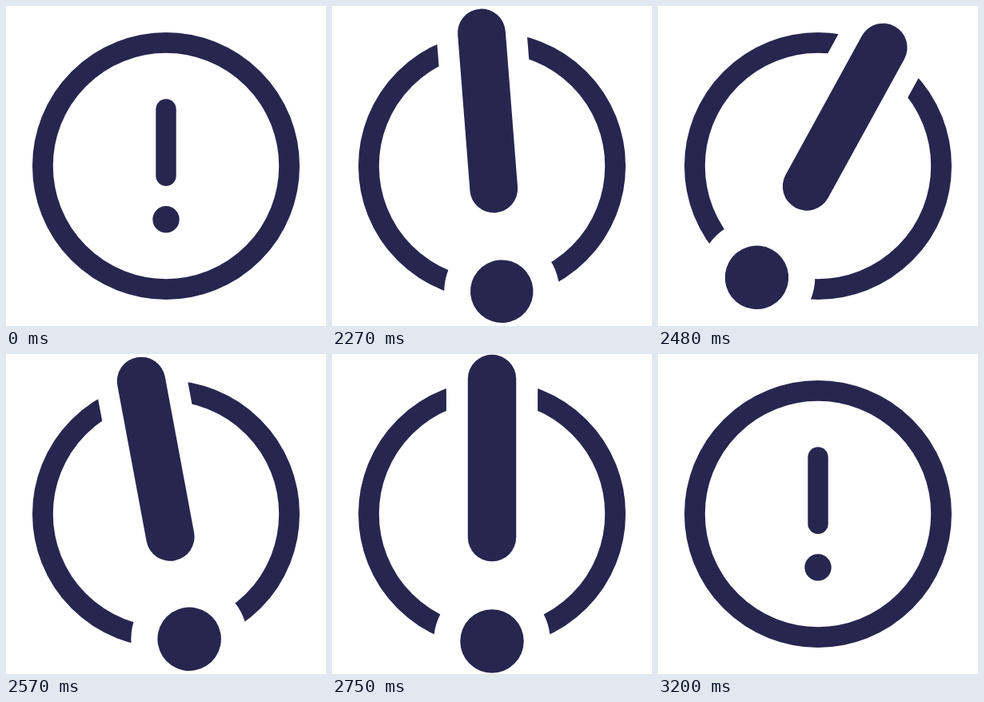
Recreate the animation shown at these times as an HTML page with a canvas. Size 400 px wide and 400 px high, loop 3260 ms.

```html
<!DOCTYPE html>
<html lang="en">
<head>
<meta charset="utf-8">
<title>Alert icon</title>
<style>
  html, body { margin: 0; width: 100%; height: 100%; overflow: hidden; background: #fff; }
  canvas { display: block; width: 100vmin; height: 100vmin; }
</style>
</head>
<body>
<canvas id="stage" width="400" height="400"></canvas>
<script>
const ctx = document.getElementById("stage").getContext("2d");
const INK = "#28264f";
const PAPER = "#fff";
const LOOP = 3260;
const STEP = 30;
const MOVE_START = 2030;
const MOVE_END = 3200;

const GROW = { start: 2015, length: 280 };
const SHRINK = { start: 2745, length: 450 };
const MAX_SCALE = 2.38;

const SWING = { start: 2238, length: 127, angle: 30.1 };
const POSES = [0, -1, 1, -1, 0];

const clamp = (x) => Math.min(1, Math.max(0, x));
const ease = (x) => (1 - Math.cos(Math.PI * clamp(x))) / 2;
const progress = (t, part) => ease((t - part.start) / part.length);

function scaleAt(t) {
  return 1 + (MAX_SCALE - 1) * (progress(t, GROW) - progress(t, SHRINK));
}

function angleAt(t) {
  const u = (t - SWING.start) / SWING.length;
  if (u <= 0 || u >= POSES.length - 1) return 0;
  const i = Math.floor(u);
  const pose = POSES[i] + (POSES[i + 1] - POSES[i]) * ease(u - i);
  return pose * SWING.angle * Math.PI / 180;
}

// The mark is drawn around the stage centre; a grown white copy cuts the ring.
function drawMark(color, barRadius, dotRadius) {
  ctx.strokeStyle = ctx.fillStyle = color;
  ctx.lineCap = "round";
  ctx.lineWidth = barRadius * 2;
  ctx.beginPath();
  ctx.moveTo(0, -71);
  ctx.lineTo(0, 12.2);
  ctx.stroke();
  ctx.beginPath();
  ctx.arc(0, 66.8, dotRadius, 0, Math.PI * 2);
  ctx.fill();
}

function draw(t) {
  ctx.setTransform(1, 0, 0, 1, 0, 0);
  ctx.fillStyle = PAPER;
  ctx.fillRect(0, 0, 400, 400);
  ctx.translate(200, 200);

  ctx.strokeStyle = INK;
  ctx.lineWidth = 25.8;
  ctx.beginPath();
  ctx.arc(0, 0, 154.1, 0, Math.PI * 2);
  ctx.stroke();

  ctx.rotate(angleAt(t));
  const s = scaleAt(t);
  ctx.scale(s, s);
  drawMark(PAPER, 24, 30.6);
  drawMark(INK, 12.7, 16.7);
}

function stepped(t) {
  if (t < MOVE_START || t >= MOVE_END) return 0;
  return MOVE_START + Math.floor((t - MOVE_START) / STEP) * STEP;
}

function tick() {
  draw(stepped(performance.now() % LOOP));
  requestAnimationFrame(tick);
}
tick();
</script>
</body>
</html>
```
